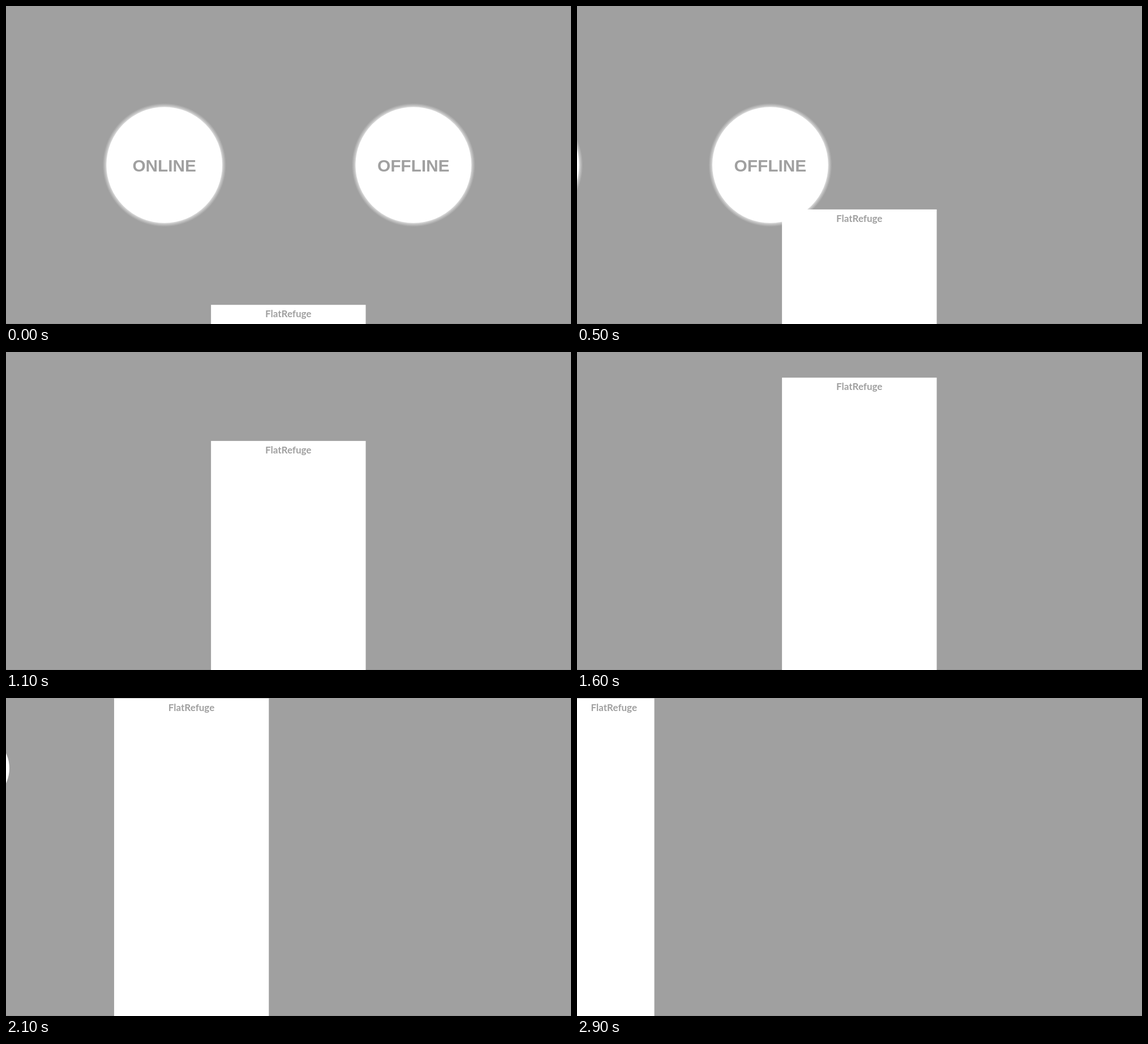
These frames come from a looping animation (998x561 px, 3 s). An HTML page with a canvas:

```html
<!DOCTYPE html>
<html lang="en">
<head>
<meta charset="utf-8">
<style>
  html, body { margin: 0; width: 100%; height: 100%; overflow: hidden; background: #a0a0a0; }
  canvas { display: block; }
</style>
</head>
<body>
<canvas id="stage" width="998" height="561"></canvas>
<script>
const ctx = document.getElementById('stage').getContext('2d');
const GRAY = '#a0a0a0';
const LOOP = 3000, STEP = 100;

// Linear interpolation through [time, value] keys, held at both ends.
function track(t, keys) {
  if (t <= keys[0][0]) return keys[0][1];
  for (let i = 1; i < keys.length; i++) {
    const [t0, v0] = keys[i - 1], [t1, v1] = keys[i];
    if (t <= t1) return v0 + (v1 - v0) * (t - t0) / (t1 - t0);
  }
  return keys[keys.length - 1][1];
}

function disc(x, y, r, fill) {
  ctx.fillStyle = fill;
  ctx.beginPath();
  ctx.arc(x, y, r, 0, Math.PI * 2);
  ctx.fill();
}

function label(text, x, y, font) {
  ctx.font = font;
  ctx.fillStyle = GRAY;
  ctx.fillText(text, x, y);
}

function button(text, x) {
  const y = 280.5, r = 102.3, outer = 109;
  const glow = ctx.createRadialGradient(x, y, r, x, y, outer);
  glow.addColorStop(0, 'rgba(255,255,255,.62)');
  glow.addColorStop(0.5, 'rgba(255,255,255,.27)');
  glow.addColorStop(1, 'rgba(255,255,255,0)');
  disc(x, y, outer, glow);
  disc(x, y, r, '#fff');
  label(text, x, 291.5, 'bold 29.8px "Liberation Sans", Arial, sans-serif');
}

function draw(t) {
  ctx.fillStyle = GRAY;
  ctx.fillRect(0, 0, 998, 561);
  ctx.fillStyle = '#959595';
  ctx.fillRect(0, 560, 998, 1);
  ctx.textAlign = 'center';

  const buttonX = track(t, [[0, 279.7], [1100, -552.7]]);
  button('ONLINE', buttonX);
  button('OFFLINE', buttonX + 440);

  if (t >= 1800) disc(track(t, [[1800, -47.5], [2400, -63.5]]), 124, 61.5, '#fff');

  const top = track(t, [[0, 527.2], [1100, 156.9], [1800, 0.6]]);
  const panelX = track(t, [[1800, 362.1], [2400, 19.8], [2900, -136.7]]);
  const titleX = track(t, [[1800, 498.7], [2400, 156.3], [2900, 65.3]]);
  ctx.fillStyle = '#fff';
  ctx.fillRect(panelX, top, 273.3, 561);
  label('FlatRefuge', titleX, top + 22, 'bold 17px Lato, sans-serif');
}

function tick() {
  const t = performance.now() % LOOP;
  draw(Math.floor(t / STEP) * STEP);
  requestAnimationFrame(tick);
}
tick();
</script>
</body>
</html>
```
